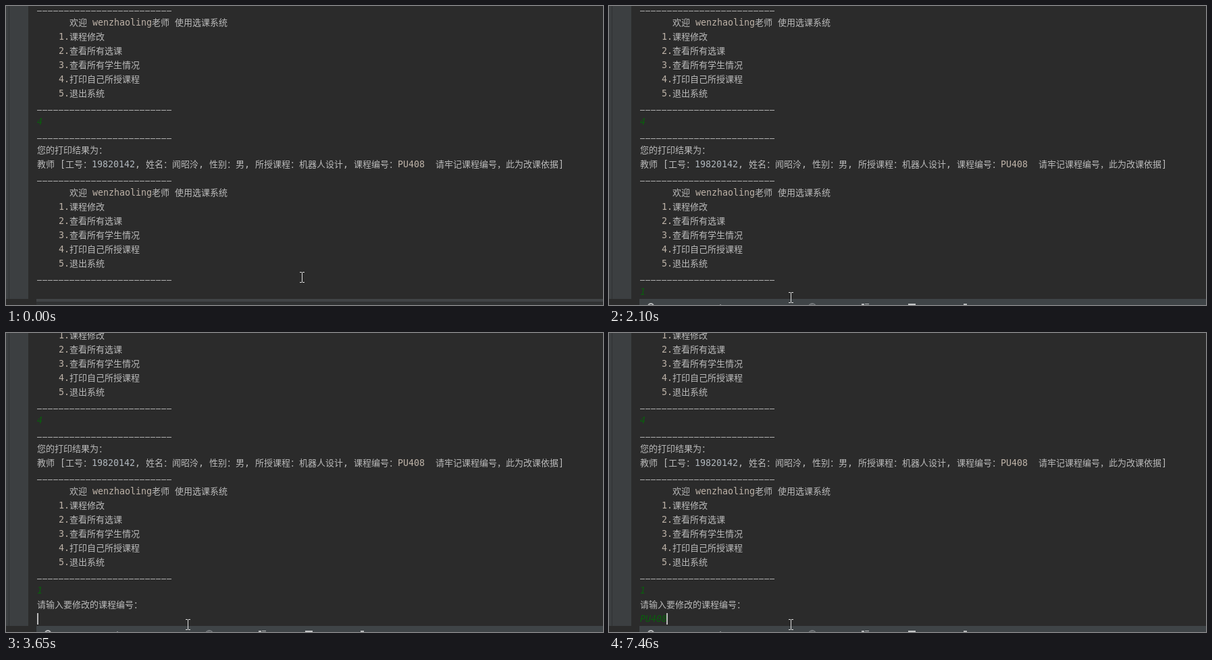
Animation of 884x443 px, one loop 8 s. Source, as an HTML page with a canvas:

```html
<!DOCTYPE html>
<html lang="zh-CN">
<head>
<meta charset="utf-8">
<title>选课系统</title>
<style>
  html, body { margin: 0; width: 100%; height: 100%; overflow: hidden; background: #2b2b2b; }
  canvas { display: block; }
</style>
</head>
<body>
<canvas id="stage" width="884" height="443"></canvas>
<script>
const ctx = document.getElementById('stage').getContext('2d', { alpha: false });
const LOOP = 8000, LEFT = 46, ROW = 21, CELL = 8, WIDE = 13;
const LATIN = '13.33px "DejaVu Sans Mono", monospace';
const CJK = '13px "Noto Sans CJK SC", "Noto Sans CJK", sans-serif';
const GREY = '#bbbbbb', WARM = '#beb3a8', COOL = '#b0b7bd', GREEN = '#0a5f0d';

const RULE = '_'.repeat(25);
const MENU = [
  RULE,
  '      欢迎 wenzhaoling老师 使用选课系统',
  '    1.课程修改',
  '    2.查看所有选课',
  '    3.查看所有学生情况',
  '    4.打印自己所授课程',
  '    5.退出系统',
  RULE
];
const HISTORY = [
  ...MENU,
  '>4',
  RULE,
  '您的打印结果为：',
  '教师 [工号：19820142, 姓名：闻昭泠, 性别：男, 所授课程：机器人设计, 课程编号：PU408  请牢记课程编号，此为改课依据]',
  ...MENU
];
const PROMPT = '请输入要修改的课程编号：';

const ENTER = 2180, REPLY = 2410;
const CODE = 'PU408', CODE_TIMES = [4820, 5060, 6920, 7070, 7460];
// The caret flips at each of these times, starting hidden.
const CARET_FLIPS = [1080, 2100, 2180, 3110, 3650, 4120, 4660, 5670, 6140, 6690, 6920];
const BAR_OPENS = 147, CLICK = 1000, RELEASE = 1160;
const POINTER = [
  [0, 438, 402], [147, 500, 389], [310, 582, 407], [540, 520, 382],
  [840, 331, 395], [920, 288, 425], [1000, 269, 432]
];

const countUntil = (times, t) => times.filter(time => time <= t).length;

function rect(color, x, y, w, h) {
  ctx.fillStyle = color;
  ctx.fillRect(x, y, w, h);
}

function drawLine(line, y) {
  if (line === RULE) {
    for (let i = 0; i < line.length; i++) rect('#b0b0b0', LEFT + i * CELL, y + 4, 7, 1);
    return;
  }
  const typed = line[0] === '>';
  const runs = (typed ? line.slice(1) : line).match(/[A-Za-z0-9.]+|[^A-Za-z0-9.]+/g) || [];
  let x = LEFT;
  for (const run of runs) {
    const word = /^[A-Za-z0-9.]/.test(run);
    ctx.fillStyle = typed ? GREEN : run === '19820142' ? COOL : word ? WARM : GREY;
    for (const ch of run) {
      const latin = ch < '\x7f';
      ctx.font = latin ? (typed ? 'italic ' : '') + LATIN : CJK;
      ctx.fillText(ch, x, y + 5);
      x += latin ? CELL : WIDE;
    }
  }
}

function drawConsole(t) {
  const lines = [...HISTORY];
  let input = t >= 1470 ? '1' : '';
  if (t >= ENTER) {
    lines.push('>1');
    input = CODE.slice(0, countUntil(CODE_TIMES, t));
  }
  if (t >= REPLY) lines.push(PROMPT);
  const scroll = (lines.length - HISTORY.length) * ROW;
  lines.push('>' + input);
  lines.forEach((line, i) => drawLine(line, 3 + i * ROW - scroll));

  if (countUntil(CARET_FLIPS, t) % 2) {
    const n = input.length;
    rect('#bbbbbb', LEFT + n * CELL - (n ? 1 : 0), 415, 2, 17);
  }
}

function drawFrameEdges(t) {
  rect('#3c3f41', 0, 0, 33, 434);
  rect('#303234', 4, 0, 1, 434);
  rect('#2b2b2b', 0, 434, 45, 9);
  if (t < BAR_OPENS) {
    rect('#414446', 45, 434, 839, 4);
    rect('#303233', 45, 438, 839, 5);
    return;
  }
  rect('#3f4447', 45, 434, 839, 9);
  ctx.lineWidth = 2;
  for (const [x, r, color] of [[62, 4, '#b8babb'], [301, 5, '#73777a']]) {
    ctx.strokeStyle = color;
    ctx.beginPath();
    ctx.arc(x, 441 + r, r, Math.PI, 0);
    ctx.stroke();
  }
  rect('#73777a', 300, 440, 1, 3);
  rect('#85888a', 164, 442, 2, 1);
  rect('#b8babb', 374, 441, 4, 2);
  rect('#b8babb', 379, 441, 6, 1);
  rect('#c4c6c7', 443, 441, 11, 2);
  rect('#b8babb', 525, 441, 5, 2);
}

function pointerAt(t) {
  // The pointer is sampled at a coarse, regular rate.
  const stepped = t < 70 ? 0 : t < 310 ? 70 + Math.floor((t - 70) / 80) * 80
    : 310 + Math.floor((t - 310) / 76.5) * 76.5;
  const next = POINTER.findIndex(p => p[0] > stepped);
  const [t0, x0, y0] = POINTER[next - 1], [t1, x1, y1] = POINTER[next];
  const k = (stepped - t0) / (t1 - t0);
  return [x0 + (x1 - x0) * k, y0 + (y1 - y0) * k].map(Math.round);
}

function drawPointer(t) {
  const [x, y] = t >= CLICK ? [269, 432] : pointerAt(t);
  if (t >= CLICK && t < RELEASE) {
    ctx.fillStyle = '#928b16';
    ctx.beginPath();
    ctx.arc(x - 2, y - 1, 12, 0, Math.PI * 2);
    ctx.fill();
  }
  const ink = '#dedede';
  rect(ink, x, y - 7, 1, 14);
  for (const end of [y - 8, y + 7]) {
    rect(ink, x - 3, end, 3, 1);
    rect(ink, x + 1, end, 3, 1);
  }
}

function draw() {
  const t = performance.now() % LOOP;
  rect('#2b2b2b', 0, 0, 884, 443);
  drawConsole(t);
  drawFrameEdges(t);
  drawPointer(t);
  requestAnimationFrame(draw);
}
draw();
</script>
</body>
</html>
```
